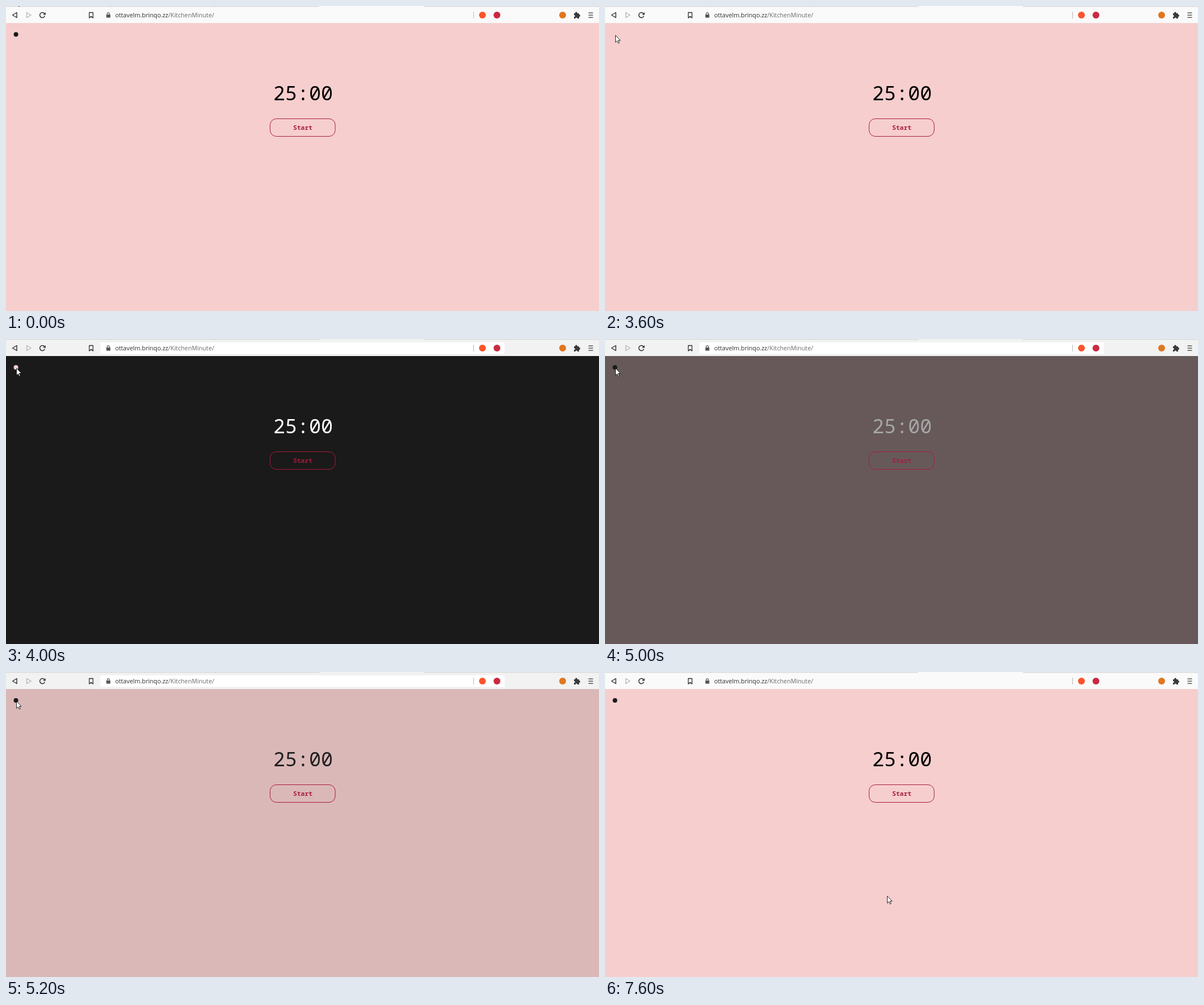
Write an HTML page with a canvas that moves like this. It is 1043 px wide and 537 px high and loops after 8 s.

```html
<!DOCTYPE html>
<html lang="en">
<head>
<meta charset="utf-8">
<title>Timer</title>
<style>
  html, body { margin: 0; width: 100%; height: 100%; overflow: hidden; }
  canvas { display: block; }
</style>
</head>
<body>
<canvas id="stage" width="1043" height="537"></canvas>
<script>
const ctx = document.getElementById('stage').getContext('2d');
const LOOP = 8000, STEP = 100;
const PINK = [246, 206, 206], DARK = [26, 26, 26], BLACK = [0, 0, 0], WHITE = [255, 255, 255];
const CRIMSON = '#a61c3c', INK = '#2e2e2e';
const BUTTON = { x: 464.5, y: 198.5, w: 114.5, h: 31 };

// Pointer moves: start time, number of steps, target x, target y
const START = [17, -14];
const MOVES = [
  [400, 3, 23, 45], [800, 5, 580, 226], [1300, 3, 520, 206], [1700, 1, 507, 188],
  [1800, 8, 215, 67], [2600, 2, 20, 38], [2900, 4, 18, 51],
  [6300, 1, 397, 147], [6400, 4, 520, 212], [7300, 4, 496, 394]
];

const mix = (a, b, p) => a + (b - a) * p;
const rgb = (a, b, p) => `rgb(${a.map((v, i) => Math.round(mix(v, b[i], p))).join(',')})`;
const smooth = x => x * x * (3 - 2 * x);

// Progress 0..1 in hard steps
function stepped(t, start, count) {
  if (t < start) return 0;
  return Math.min(1, (Math.floor((t - start) / STEP) + 1) / count);
}

function pointerAt(t) {
  let [x, y] = START;
  for (const [start, count, tx, ty] of MOVES) {
    const p = smooth(stepped(t, start, count));
    x = mix(x, tx, p);
    y = mix(y, ty, p);
  }
  return [Math.round(x), Math.round(y)];
}

function darkness(t) {
  const fade = x => 1 - (1 - x) ** 1.5;
  return fade(stepped(t, 3800, 3)) - fade(stepped(t, 5000, 4));
}

function rect(x, y, w, h, color) {
  ctx.fillStyle = color;
  ctx.fillRect(x, y, w, h);
}

function disc(x, y, r, color) {
  ctx.fillStyle = color;
  ctx.beginPath();
  ctx.arc(x, y, r, 0, Math.PI * 2);
  ctx.fill();
}

function poly(points, closed = true) {
  ctx.beginPath();
  points.forEach(([x, y]) => ctx.lineTo(x, y));
  if (closed) ctx.closePath();
}

function stroke(color, width) {
  ctx.strokeStyle = color;
  ctx.lineWidth = width;
  ctx.stroke();
}

function text(str, x, y, font, color, align = 'left') {
  ctx.font = font;
  ctx.fillStyle = color;
  ctx.textAlign = align;
  ctx.fillText(str, x, y);
  return ctx.measureText(str).width;
}

function drawNavigation() {
  ctx.lineJoin = 'round';
  poly([[11.5, 16], [19, 11.5], [19, 20.5]]);
  stroke(INK, 1.4);
  poly([[44, 16], [36.5, 11.5], [36.5, 20.5]]);
  stroke('#b4b4b4', 1.3);

  ctx.beginPath();
  ctx.arc(64, 16, 4.5, 0.35, Math.PI * 1.78);
  stroke(INK, 1.5);
  poly([[69.6, 11], [69.6, 15.6], [65, 15.6]]);
  ctx.fillStyle = INK;
  ctx.fill();

  poly([[146.5, 11.5], [153, 11.5], [153, 21], [149.75, 18.2], [146.5, 21]]);
  stroke(INK, 1.3);
}

function drawAddress() {
  rect(176.5, 15, 7, 5.5, '#555');
  ctx.beginPath();
  ctx.arc(180, 14, 2.1, Math.PI, 0);
  ctx.lineTo(182.1, 15.5);
  ctx.moveTo(177.9, 14);
  ctx.lineTo(177.9, 15.5);
  stroke('#555', 1.1);
  const font = '10.75px "Open Sans", "Noto Sans", sans-serif';
  const w = text('ottavelm.brinqo.zz', 192, 20, font, '#303030');
  text('/KitchenMinute/', 192 + w, 20, font, '#6a6a6a');
}

function drawTools() {
  rect(822, 10, 1, 12, '#b8b8b8');
  disc(838, 16, 6, '#fb542b');
  disc(863.5, 16, 6, '#c92a42');
  disc(979, 16, 6, '#e0771f');

  rect(999, 13, 9, 9, '#3a3a3a');
  disc(1003, 12.5, 2, '#3a3a3a');
  disc(1008, 17, 2, '#3a3a3a');
  disc(999.3, 17.5, 1.6, '#f6f6f6');
  disc(1003.3, 21.8, 1.6, '#f6f6f6');
  for (const y of [12, 16, 20]) rect(1024.5, y - 0.5, 8, 1.2, INK);
}

function drawToolbar(dark) {
  rect(0, 0, 1043, 30, dark ? '#f2f2f2' : '#fafafa');
  if (dark) rect(166, 6, 711, 20, '#fff');
  rect(0, 0, 551, 1.4, '#d9d9d9');
  rect(735, 0, 308, 1.4, '#d9d9d9');
  for (const x of [185, 368]) rect(x, 0, 1, 1, '#a8a8a8');
  drawNavigation();
  drawAddress();
  drawTools();
}

function drawButton(hover) {
  const { x, y, w, h } = BUTTON;
  ctx.beginPath();
  ctx.roundRect(x, y, w, h, 11);
  if (hover) {
    ctx.save();
    ctx.shadowColor = 'rgba(0,0,0,.35)';
    ctx.shadowOffsetX = 2;
    ctx.shadowOffsetY = 1;
    ctx.shadowBlur = 2;
    ctx.fillStyle = CRIMSON;
    ctx.fill();
    ctx.restore();
  }
  stroke(CRIMSON, 1);
  text('Start', 522, 218, 'bold 11.3px "Noto Sans Mono", monospace',
    hover ? rgb(PINK, PINK, 0) : CRIMSON, 'center');
}

function drawPointer(x, y) {
  ctx.save();
  ctx.translate(x + 0.5, y + 0.5);
  ctx.scale(0.78, 0.78);
  ctx.lineJoin = 'miter';
  poly([[0, 0], [0, 16], [3.7, 12.7], [6.3, 18.2], [8.6, 17.2], [6.1, 11.6], [11, 11.6]]);
  ctx.fillStyle = '#fff';
  ctx.fill();
  stroke('#111', 1.15);
  ctx.restore();
}

function draw(t) {
  const dark = darkness(t);
  const [px, py] = pointerAt(t);
  const { x, y, w, h } = BUTTON;
  const hover = px > x && px < x + w && py > y && py < y + h;

  rect(0, 30, 1043, 507, rgb(PINK, DARK, dark));
  drawToolbar(dark > 0);
  // The dot switches at the click, before the page fades
  disc(17.5, 50, 4, rgb(DARK, PINK, t >= 3600 && t < 5000 ? 1 : 0));
  text('25:00', 522.5, 166, '35px "Noto Sans Mono", monospace', rgb(BLACK, WHITE, dark), 'center');
  drawButton(hover);
  drawPointer(px, py);
}

const began = performance.now();
function tick() {
  draw((performance.now() - began) % LOOP);
  requestAnimationFrame(tick);
}
tick();
</script>
</body>
</html>
```
